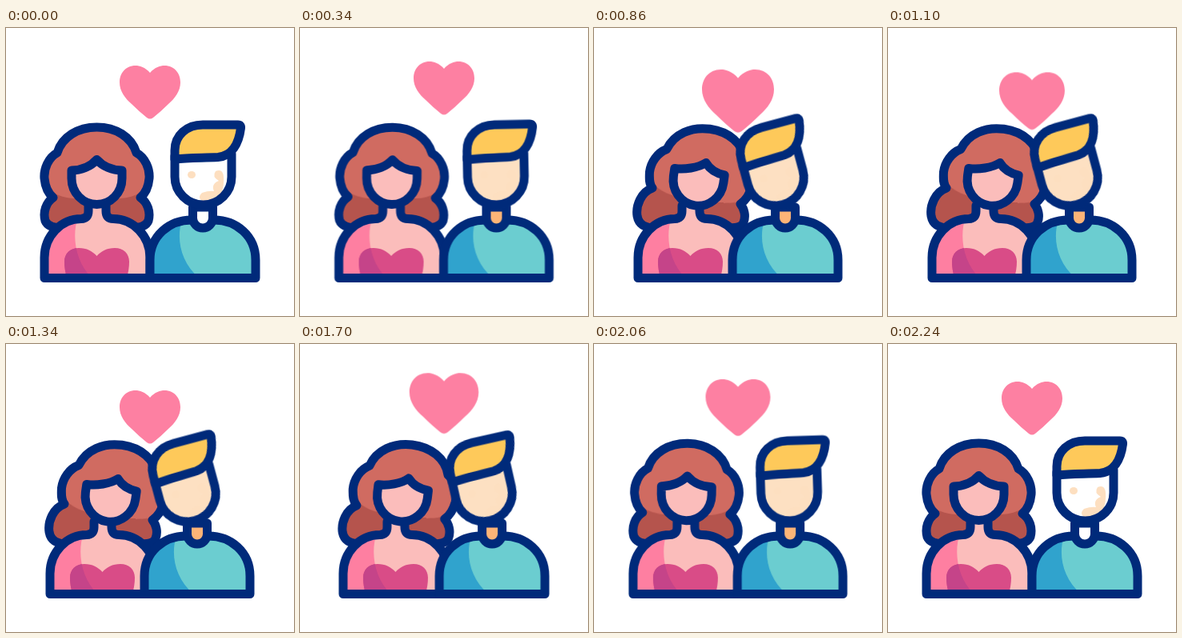
An HTML page without scripts for the animation above (2.4 s loop, 360 by 360 pixels).

```html
<!DOCTYPE html>
<html lang="en">
<head>
<meta charset="utf-8">
<title>Couple</title>
<style>
html, body { margin: 0; width: 100%; height: 100%; overflow: hidden; background: #fff; }
svg { display: block; width: 100vw; height: 100vh; }
.line { stroke: #002a7a; stroke-width: 11; stroke-linejoin: round; stroke-linecap: round; }
.none { fill: none; }
.skin { fill: #fbbdbb; }
.her, .him, .crown, .his-head, .hair, .fringe, .face, .neck, .rise, .beat {
  animation: 2400ms infinite cubic-bezier(.37, 0, .63, 1);
}
.her { animation-name: her; }
.him { animation-name: him; }
.crown { animation-name: crown; transform-origin: 113px 250px; }
.his-head { animation-name: his-head; transform-origin: 244px 235px; }
.hair {
  animation-name: hair;
  d: path("M113.5 124C90 124 70 136 64 156C53 162 47 176 48 188C49 199 53 207 59 212C50 218 46 230 49 241C52 248 60 250 70 250H157C167 250 175 248 178 241C181 230 177 218 168 212C174 207 178 199 179 188C180 176 174 162 163 156C157 136 137 124 113.5 124Z");
}
.fringe {
  animation-name: fringe;
  d: path("M82 178C94 178 106 173 113.5 164.5C121 173 133 178 145 178L145 188C145 206 131 220.5 113.5 220.5C96 220.5 82 206 82 188Z");
}
.face { animation-name: face; animation-timing-function: step-end; }
.neck { animation-name: neck; animation-timing-function: step-end; }
.rise { animation-name: rise; }
.beat { animation-name: beat; transform-origin: 180px 80.5px; }

/* lean in 220-880 ms, lean back 1520-2220 ms */
@keyframes her {
  0%, 9.17%, 92.5%, 100% { transform: none; }
  36.67%, 63.33% { transform: translateX(7px); }
}
@keyframes him {
  0%, 9.17%, 92.5%, 100% { transform: none; }
  36.67%, 63.33% { transform: translateX(-7px); }
}
@keyframes crown {
  0%, 9.17%, 92.5%, 100% { transform: translate(0, 0) rotate(0deg); }
  36.67%, 63.33% { transform: translate(7px, 1px) rotate(8deg); }
}
@keyframes his-head {
  0%, 9.17%, 92.5%, 100% { transform: rotate(0deg); }
  36.67%, 63.33% { transform: rotate(-15deg); }
}
/* the crown tilts while the lower curls stay on the shoulders */
@keyframes hair {
  0%, 9.17%, 92.5%, 100% {
    d: path("M113.5 124C90 124 70 136 64 156C53 162 47 176 48 188C49 199 53 207 59 212C50 218 46 230 49 241C52 248 60 250 70 250H157C167 250 175 248 178 241C181 230 177 218 168 212C174 207 178 199 179 188C180 176 174 162 163 156C157 136 137 124 113.5 124Z");
  }
  36.67%, 63.33% {
    d: path("M138 126.3C114.7 123.1 93.2 132.1 84 151.5C72 156 64 168 62.5 180C62 189 62 195 66 200C52 205 45 222 47 235C49 246 57 250 70 250H160C170 250 178 249 180 243C183 235 181 226 176 220C182 216 187 209 190 199C193 187 190 172 182 165C179.4 144.2 161.3 129.6 138 126.3Z");
  }
}
@keyframes fringe {
  0%, 9.17%, 92.5%, 100% {
    d: path("M82 178C94 178 106 173 113.5 164.5C121 173 133 178 145 178L145 188C145 206 131 220.5 113.5 220.5C96 220.5 82 206 82 188Z");
  }
  36.67%, 63.33% {
    d: path("M93.8 175.4C106 177 123 175 133 168.5C138 177 147 182 156.2 184L154.8 194C152.3 211.8 136.4 224.3 119.1 221.9C101.8 219.4 89.9 203.1 92.4 185.3Z");
  }
}
@keyframes face {
  0%, 93.33%, 100% { fill: #fff; }
  9.17% { fill: #fde0c2; }
}
@keyframes neck {
  0%, 93.33%, 100% { fill: #fff; }
  9.17% { fill: #fdb477; }
}
@keyframes rise {
  0%, 9.17% { transform: none; }
  15.83% { transform: translateY(-6px); animation-timing-function: cubic-bezier(.3, .5, .6, 1); }
  35.42%, 55.83% { transform: translateY(11px); }
  70% { transform: translateY(-6.5px); animation-timing-function: cubic-bezier(.3, .5, .6, 1); }
  93.33%, 100% { transform: none; }
}
@keyframes beat {
  0%, 19.17%, 55.83%, 58.75%, 93.33%, 100% { transform: scale(1); }
  33.33% { transform: scale(1.19); }
  75.83% { transform: scale(1.17); }
}
</style>
</head>
<body>
<svg viewBox="0 0 360 360">
  <defs>
    <path id="bust" d="M48 312.500V287C48 260 69 238.500 94 238.500Q103 238 103 229V220H125V229Q125 238.500 134 238.500C159 238.500 180 260 180 287V312.500Z"/>
    <path id="shirt" d="M180 312.500V290C180 260 204 240 232 240H260C288 240 312 260 312 290V312.500Z"/>
    <path id="bodice" d="M76 312C74 305 73 299 73 292C73 282 80 275 91 275C101 275 108 279 113.500 285C119 279 126 275 136 275C147 275 154 282 154 292C154 299 153 305 151 312Z"/>
    <path id="shade" d="M40 315V236H90C82 260 86 293 110 315Z"/>
    <path id="jaw" d="M211 160V186A35.500 35 0 0 0 282 186V157Z"/>
    <clipPath id="in-bust"><use href="#bust"/></clipPath>
    <clipPath id="in-shirt"><use href="#shirt"/></clipPath>
    <clipPath id="in-shade"><use href="#shade"/></clipPath>
    <clipPath id="in-hair"><path class="hair"/></clipPath>
  </defs>

  <g class="rise">
    <path class="beat" fill="#fd80a2" d="M180 56C186 49 193 47 198 47C211 47 218 57 218 68C218 79 211 88 203 95Q193 105 184 112Q180 115 176 112Q167 105 157 95C149 88 142 79 142 68C142 57 149 47 162 47C167 47 174 49 180 56Z"/>
  </g>

  <g class="her">
    <path class="hair" fill="#b5544d"/>
    <g clip-path="url(#in-hair)">
      <path class="crown" fill="#d06b61" d="M40 110H187V188C177 203 162 212 143 213H84C65 212 50 203 40 188Z"/>
    </g>
    <path class="hair line none"/>
    <use class="skin" href="#bust"/>
    <g clip-path="url(#in-bust)">
      <use href="#shade" fill="#fe7fa1"/>
      <use href="#bodice" fill="#d94c87"/>
      <use href="#bodice" fill="#c54489" clip-path="url(#in-shade)"/>
    </g>
    <path class="line none" d="M103 222V229Q103 238 94 238.500C69 238.500 48 260 48 287V312.500H180V287C180 260 159 238.500 134 238.500Q125 238.500 125 229V222"/>
    <path class="fringe line skin"/>
  </g>

  <g class="him">
    <use href="#shirt" fill="#6bcdd0"/>
    <path clip-path="url(#in-shirt)" fill="#30a3cd" d="M174 315V236H221C212 262 217 293 244 315Z"/>
    <use class="line none" href="#shirt"/>
    <path class="neck line" d="M233.500 224V237.500A12.500 12.500 0 0 0 258.500 237.500V224Z"/>
    <g class="his-head">
      <use class="face" href="#jaw"/>
      <g fill="#fddfc0">
        <ellipse cx="232" cy="183.500" rx="5" ry="4.500"/>
        <path d="M262 179Q271 175 272 186Q273 197 269 207Q261 216 247 217Q238 213 245 206Q254 203 260 204Q256 195 266 191Q257 186 262 179Z"/>
      </g>
      <use class="line none" href="#jaw"/>
      <path class="line" fill="#fec95a" d="M211 164V153C211 134 226 121 246 121H290Q294 121 293.500 125C291 145 282 160 265 161.500C245 162.500 228 162 211 164Z"/>
    </g>
  </g>
</svg>
</body>
</html>
```
